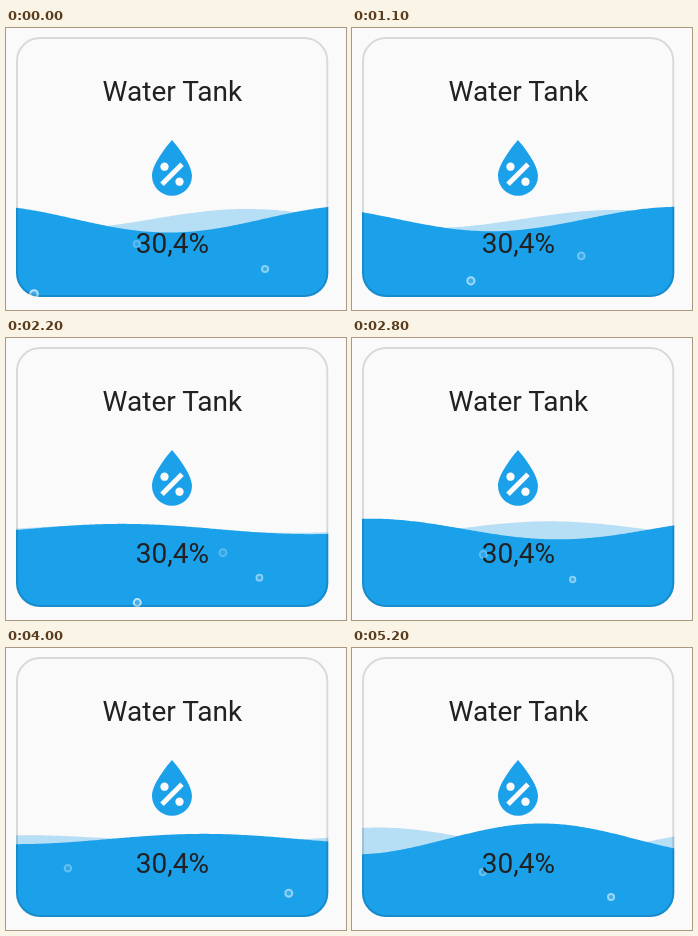
An HTML page that plays this animation: 340 px wide and 282 px high, repeating every 5300 ms.

```html
<!DOCTYPE html>
<html lang="en">
<head>
<meta charset="utf-8">
<title>Water Tank</title>
<style>
  html, body { margin: 0; height: 100%; overflow: hidden; background: #fafafa; }
  svg { display: block; }
  text { font: 28px Roboto, sans-serif; fill: #212121; text-anchor: middle; }
  .water { fill: #1ba0ea; }
  #fluid { filter: blur(.6px); }
  #bubbles { fill: #fff; fill-opacity: .25; stroke: #fff; stroke-width: 2; }
</style>
</head>
<body>
<svg width="340" height="282" viewBox="0 0 340 282">
  <clipPath id="card"><rect x="10" y="9" width="312.3" height="260" rx="24"/></clipPath>
  <g clip-path="url(#card)">
    <g id="fluid">
      <path id="back" class="water" opacity=".3"/>
      <path id="front" class="water"/>
      <g id="bubbles"></g>
    </g>
  </g>
  <rect x="11" y="10" width="310.3" height="258" rx="23" fill="none" stroke="#000" stroke-opacity=".13" stroke-width="2"/>
  <path class="water" fill-rule="evenodd" transform="translate(126 101.2) scale(3.333)"
    d="M12 3.25S6 10 6 14a6 6 0 0 0 12 0C18 10 12 3.25 12 3.25Z
       M14.47 9.97l1.06 1.06-6 6-1.06-1.06Z
       M8.5 11.25a1.25 1.25 0 0 1 2.5 0a1.25 1.25 0 0 1-2.5 0Z
       M13 15.75a1.25 1.25 0 0 1 2.5 0a1.25 1.25 0 0 1-2.5 0Z"/>
  <text x="166.4" y="73">Water Tank</text>
  <text x="166.4" y="225">30,4%</text>
</svg>
<script>
const LOOP = 5.3, STEP = 0.1;
const LEVEL = 191, BOTTOM = 266, TOP = 205, RISE = 80;
const BUBBLES = 17;
const byId = id => document.getElementById(id);

let seed = 7;
const random = (min, max) => {
  seed = seed * 16807 % 2147483647;
  return min + (max - min) * seed / 2147483647;
};

// Bubbles start at regular intervals, at random places along the bottom.
const bubbles = Array.from({ length: BUBBLES }, (_, i) => {
  const node = document.createElementNS("http://www.w3.org/2000/svg", "circle");
  node.setAttribute("cx", random(28, 304));
  node.setAttribute("r", random(2.6, 3.9));
  byId("bubbles").append(node);
  return { birth: i * LOOP / BUBBLES, node };
});

function drawWave(id, amplitude, center) {
  let d = "M4 290";
  for (let x = 4; x <= 330; x += 2) {
    d += `L${x} ${(LEVEL + amplitude * Math.cos((x - center) / 60)).toFixed(2)}`;
  }
  byId(id).setAttribute("d", d + "V290Z");
}

function draw(t) {
  // Two opposing waves whose heights swell and collapse together.
  const swell = Math.sin((t - 0.59) * 100 * Math.PI / 180);
  drawWave("back", 11.7 * swell, 241 - 150 * t);
  drawWave("front", -15.8 * swell, 163 + 150 * t);

  for (const { birth, node } of bubbles) {
    const age = (t - birth + LOOP) % LOOP;
    const y = BOTTOM - RISE * age;
    const depth = (y - TOP) / (BOTTOM - TOP);
    node.setAttribute("cy", y);
    node.setAttribute("opacity", depth > 0 ? 0.2 + 0.5 * depth : 0);
  }
}

const start = performance.now();
function tick() {
  const elapsed = (performance.now() - start) / 1000 % LOOP;
  draw(Math.floor(elapsed / STEP) * STEP);
  requestAnimationFrame(tick);
}
tick();
</script>
</body>
</html>
```
